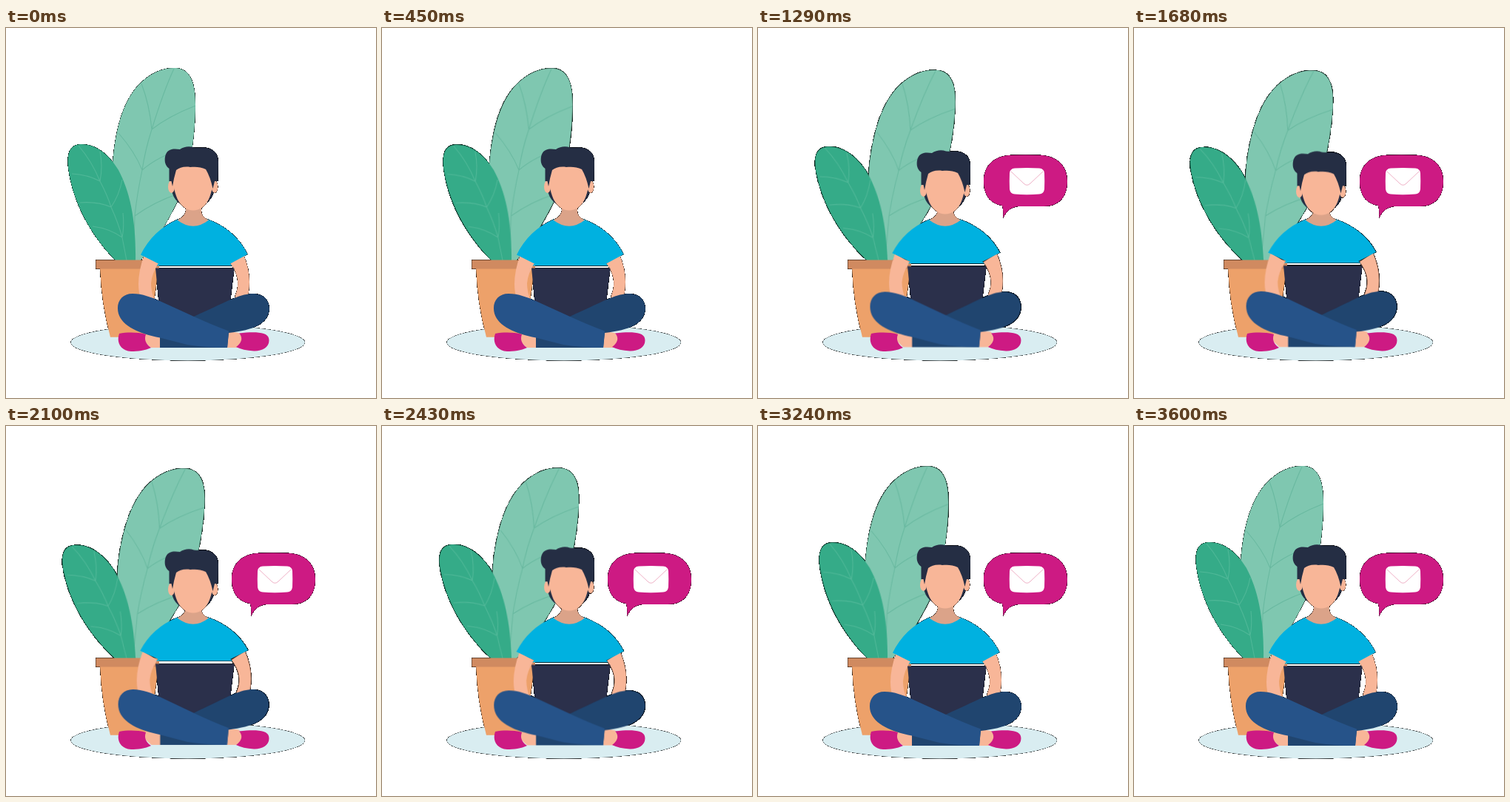
These frames come from a looping animation (500x500 px, 3660 ms). An HTML page without scripts:

```html
<!DOCTYPE html>
<html lang="en">
<head>
<meta charset="utf-8">
<title>Working with a laptop</title>
<style>
  html, body { margin: 0; width: 100%; height: 100%; overflow: hidden; background: #fff; }
  svg { display: block; width: 100vw; height: 100vh; }

  .sway, .breathe, .pop { animation: 3660ms ease-in-out infinite; }
  .sway { animation-name: sway; }
  .breathe { animation-name: breathe; }
  .pop { animation-name: pop; transform-origin: 331px 257px; }

  .big { --pose: rotate(3.55deg); transform-origin: 178px 314px; }
  .small { --pose: rotate(-3.4deg); transform-origin: 165px 314px; }
  .head { --pose: translateY(6.3px); }
  .shirt { --pose: scale(1.01, .94); transform-origin: 254px 258px; }
  .arms { --pose: translateY(-2px) scaleX(1.032); transform-origin: 254px 320px; }
  .laptop { --pose: translateY(-3.3px); }
  .legs { --pose: translateY(-1px) scale(.994, 1.03); transform-origin: 254px 432px; }

  @keyframes sway {
    0%, 100% { transform: none; }
    50% { transform: var(--pose); }
  }
  @keyframes breathe {
    0%, 19.7%, 78.7%, 100% { transform: none; }
    42.6%, 54.1% { transform: var(--pose); }
  }
  @keyframes pop {
    0%, 14.2% { transform: scale(0); animation-timing-function: ease-out; }
    23%, 100% { transform: none; }
  }

  .skin { fill: #f8b698; }
  .hair { fill: #252e44; }
  .shoe { fill: #cd1a83; }
  .veins { fill: none; stroke-width: 1.1; }
</style>
</head>
<body>
<svg viewBox="0 0 500 500">
  <!-- Soft edge pixels are backed with black to give the thin dark rim -->
  <filter id="rim" filterUnits="userSpaceOnUse" x="0" y="0" width="500" height="500" color-interpolation-filters="sRGB">
    <feColorMatrix values="0 0 0 0 0  0 0 0 0 0  0 0 0 0 0  0 0 0 30 -3"/>
    <feMerge>
      <feMergeNode/>
      <feMergeNode in="SourceGraphic"/>
    </feMerge>
  </filter>

  <g filter="url(#rim)">
    <ellipse cx="245.7" cy="425" rx="158.2" ry="24.4" fill="#d9edf1"/>

    <g class="sway big">
      <path fill="#7fc7b0" d="M176 316C150 270 140 215 145 172C150 128 160 98 179 77C195 60 214 53 230 54C250 56 256 75 256 103C256 150 247 205 230 238C215 268 197 298 180 316Z"/>
      <path class="veins" stroke="#69b9a0" d="M227 55Q213 85 197 137Q188 165 184 192Q177 225 174 254L172 312M183 75Q194 104 197 137Q220 119 256 105M152 142Q174 167 184 192Q206 173 240 163M174 254Q200 235 233 224"/>
    </g>

    <g class="sway small">
      <path fill="#35ab88" d="M150 316C118 285 92 240 85 195C81 172 85 158 100 157C122 156 140 172 152 192C168 222 176 262 175 316Z"/>
      <path class="veins" stroke="#50b898" d="M98 159Q116 180 127 207Q137 226 142 242Q152 264 157 283L163 314M89 197Q110 198 127 207Q131 187 127 167M100 236Q123 234 142 242Q153 226 157 205M117 268Q140 271 157 283Q160 268 158 250"/>
    </g>

    <path fill="#eda16a" d="M127 324H206L194 417.700H141Q129 374 127 324Z"/>
    <path fill="#d08a60" d="M121.400 313.400H207V325.600H121.400Z"/>

    <g class="breathe arms skin">
      <path d="M187 306Q179 328 179 346Q179 358 183 370H202Q196 358 196 345Q197 332 206 318Z"/>
      <path d="M321 306Q329 325 329 343Q329 356 325 370H311Q308 364 311 358Q318 338 303 318Z"/>
    </g>

    <path class="breathe laptop" fill="#2b304b" d="M202 324.6H308.5L300 395H209Z"/>

    <path class="breathe shirt" fill="#00b1e0" d="M232 258.500Q198 273.500 182 306.500L206 318.600L203.500 321.200H305.500L303 318.600L326.500 305.700Q310.500 273 273 258.500Z"/>
    <path fill="#dba389" d="M242 236L243 246C242 253 238 256 231.500 259.500Q253 276 274 259.500C267 256 264 253 264 246L265 236Z"/>

    <g class="breathe head">
      <path class="hair" d="M223 216Q225 229 233 236H272Q281 227 282 216Z"/>
      <g class="skin">
        <ellipse cx="223.500" cy="214.500" rx="4.500" ry="8.500"/>
        <ellipse cx="282" cy="214.500" rx="4.300" ry="8.500"/>
        <path d="M226 186C223 225 235 246.500 253 246.500C270 246.500 282 228 280 186Z"/>
      </g>
      <path class="hair" d="M220.500 207V190C215 186 214 180 215 174C217 163 226 162.500 235 164C241 160 248 159.500 254 161.500Q260 162 266 161.500C278 161.500 287 168 287 181L286.500 207H282L279.500 217Q276 201 270 191C263 187 254 187.500 249 188C241 186.500 234 189 230 192Q227 202 225 214L223.500 207Z"/>
    </g>

    <g class="breathe legs">
      <path class="skin" d="M188 414L210 417V432H196L186 423ZM300 410L315 412L320 420L316 432H299Z"/>
      <path fill="#20456f" d="M208 432L208 412L262 386C290 374 312 361 328 359.500C347 357 356 367 356 380C354 400 335 408 301 412L299 432Z"/>
      <path fill="#265389" d="M301 409.500L299 432Q270 432 245 428L208 418.500C180 413 157 403 152 386C148 371 156 359 171 359C184 359 197 364 208 369L253 389.500Q278 401 301 409.500Z"/>
    </g>
    <g class="shoe">
      <path d="M153 413C164 411 178 411 189 414C186 422 190 428 196 432C188 436 178 437 169 437C154 436 149 424 153 413Z"/>
      <path d="M315 412.500C337 410 353 411 355 419C358 431 346 437 335 436.500C325 436 317 434 311 431C318 426 321 419 315 412.500Z"/>
    </g>

    <g class="pop">
      <path class="shoe" d="M343 171.800Q361 171 380 171.800C405 172.500 418 187 418 207C418 228 407 241 386 241H352Q338 242 331 257Q332 247 330 240C313 237 305 225 305 207C305 186 319 172.500 343 171.800Z"/>
      <path fill="#fff" d="M347 189.500Q363 188.500 380 189.500Q386.500 190 387 196Q387.500 207 387 218Q386 224 380 224.500Q363 226 347 224.500Q341 224 340 218Q339.500 207 340 196Q340.500 190 347 189.500Z"/>
      <path fill="none" stroke="#efb0c6" d="M342 194L359 210Q363.500 214.500 368 210L385 194"/>
    </g>
  </g>
</svg>
</body>
</html>
```
